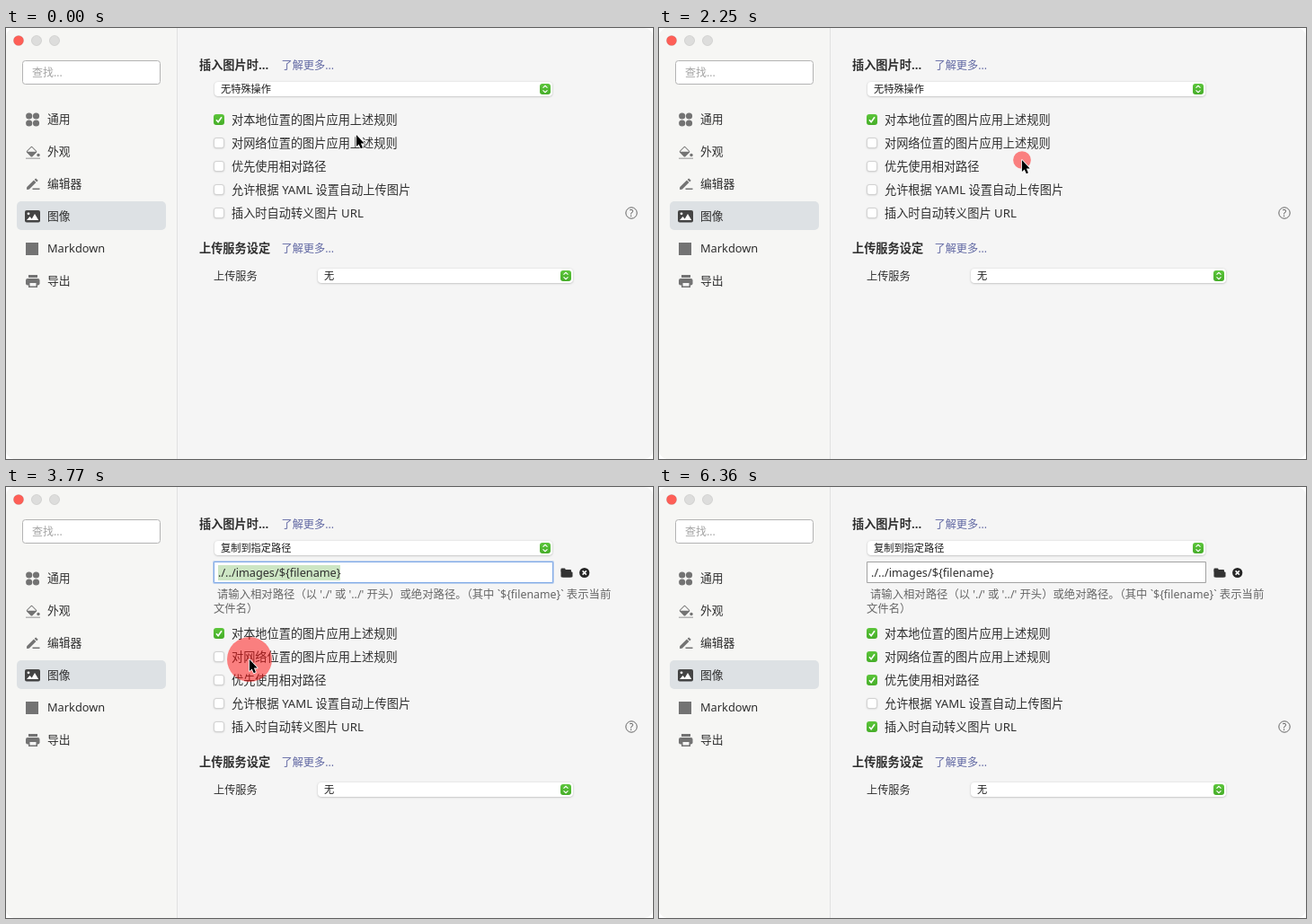
Write an HTML page with a canvas that moves like this. It is 720 px wide and 480 px high and loops after 7.55 s.

```html
<!DOCTYPE html>
<html lang="zh-CN">
<head>
<meta charset="utf-8">
<title>图像设置</title>
<style>
html, body { margin: 0; width: 100%; height: 100%; overflow: hidden; background: #fff; }
canvas { display: block; width: 720px; height: 480px; }
</style>
</head>
<body>
<canvas id="stage"></canvas>
<script>
const LOOP = 7550, MOVE = 310, RIPPLE = 450;
const FONT = '"Noto Sans", "Noto Sans CJK SC", "Noto Sans CJK", sans-serif';
const INK = '#2f2f2f', LINK = '#6168a3', ICON = '#737373', PANEL = '#f5f5f5', ROW = '#dde1e4';

const canvas = document.getElementById('stage');
const ctx = canvas.getContext('2d');
const dpr = window.devicePixelRatio || 1;
canvas.width = 720 * dpr;
canvas.height = 480 * dpr;

// Pointer stops: arrival time and place
const stops = [
  { at: 0, x: 389, y: 118 },
  { at: 570, x: 441, y: 72.5 },
  { at: 1450, x: 412, y: 116 },
  { at: 1790, x: 403, y: 146 },
  { at: 2670, x: 379, y: 122 },
  { at: 3200, x: 290, y: 174 },
  { at: 3510, x: 270, y: 191 },
  { at: 4190, x: 265, y: 226 },
  { at: 4610, x: 270, y: 223 },
  { at: 5220, x: 264, y: 264 },
  { at: 6170, x: 366, y: 351 }
];
const pointerEnd = 6340;
const clicks = [720, 2020, 3770, 4760, 5680];
const [, pick, tickWeb, tickRelative, tickEscape] = clicks;
const expandAt = pick + 390;

const options = [
  ['对本地位置的图片应用上述规则', 0],
  ['对网络位置的图片应用上述规则', tickWeb],
  ['优先使用相对路径', tickRelative],
  ['允许根据 YAML 设置自动上传图片', Infinity],
  ['插入时自动转义图片 URL', tickEscape]
];

function text(str, x, y, size = 13.2, color = INK, weight = 400) {
  ctx.font = `${weight} ${size}px ${FONT}`;
  ctx.fillStyle = color;
  ctx.fillText(str, x, y);
}

function paint(fill, stroke, width = 1) {
  if (fill) { ctx.fillStyle = fill; ctx.fill(); }
  if (stroke) { ctx.strokeStyle = stroke; ctx.lineWidth = width; ctx.stroke(); }
}

function box(x, y, w, h, r, fill, stroke) {
  ctx.beginPath();
  ctx.roundRect(x, y, w, h, r);
  paint(fill, stroke);
}

function disc(x, y, r, fill, stroke) {
  ctx.beginPath();
  ctx.arc(x, y, r, 0, Math.PI * 2);
  paint(fill, stroke);
}

function path(...points) {
  ctx.beginPath();
  for (let i = 0; i < points.length; i += 2) ctx.lineTo(points[i], points[i + 1]);
}

function at(x, y, angle, draw) {
  ctx.save();
  ctx.translate(x, y);
  ctx.rotate(angle);
  draw();
  ctx.restore();
}

function raised(x, y, w, h, r) {
  ctx.save();
  ctx.shadowColor = 'rgba(0,0,0,.28)';
  ctx.shadowBlur = 2 * dpr;
  ctx.shadowOffsetY = 0.6 * dpr;
  box(x, y, w, h, r, '#fff');
  ctx.restore();
}

function green(x, y) {
  const g = ctx.createLinearGradient(0, y, 0, y + 12);
  g.addColorStop(0, '#5cc53b');
  g.addColorStop(1, '#45ad28');
  box(x, y, 12, 12, 3, g);
}

function select(x, y, w, label) {
  raised(x, y, w, 16, 4);
  text(label, x + 7, y + 12, 11.2, '#1c1c1c');
  green(x + w - 14, y + 2);
  for (const dir of [-1, 1]) {
    at(x + w - 8, y + 8, 0, () => {
      path(-2.5, dir * 1.4, 0, dir * 3.7, 2.5, dir * 1.4);
      paint(null, '#fff', 1.2);
    });
  }
}

function checkbox(x, y, on) {
  if (on) {
    green(x, y);
    path(x + 3, y + 6.3, x + 5.1, y + 8.8, x + 9, y + 3.3);
    paint(null, '#fff', 1.6);
  } else {
    raised(x + 0.5, y + 0.5, 11, 11, 2.5);
    box(x + 0.5, y + 0.5, 11, 11, 2.5, null, '#d2d2d2');
  }
}

function peak(x, base, half, height) {
  path(x - half, base, x, base - height, x + half, base);
  paint('#fff');
}

function drawIcons() {
  for (const x of [25.7, 33.5]) for (const y of [98, 106]) disc(x, y, 3.6, ICON);

  // paint bucket
  at(28.5, 137.7, Math.PI / 4, () => {
    box(-4, -4, 8, 8, 1, null, ICON);
    path(-4, 4, 4, 4, 4, -4);
    paint(ICON);
  });
  disc(36, 141.5, 1.7, ICON);
  box(22, 144.5, 16, 1.5, 0, '#b4b4b4');

  // pencil
  at(23, 180, -Math.PI / 4, () => {
    path(0, 0, 2, -1.8, 13, -1.8, 13, 1.8, 2, 1.8);
    paint(ICON);
    box(14, -1.8, 2.2, 3.6, 0.5, ICON);
  });
  box(29.5, 178.5, 8, 1.5, 0, ICON);

  // picture
  box(21, 203, 17, 13.5, 2, '#444');
  disc(25, 206.8, 1.4, '#fff');
  peak(26.5, 214, 3.5, 4);
  peak(32, 214, 4.2, 7);

  box(22, 239, 14, 14, 0, ICON);

  // printer
  box(25, 275, 10, 3, 0, ICON);
  box(22, 279, 15.5, 7.5, 2, ICON);
  box(25, 283, 10, 6, 0, ICON);
  box(26.5, 284, 7, 3.5, 0, PANEL);
}

function drawSidebar() {
  box(0, 0, 720, 480, 10, PANEL);
  box(0, 0, 190, 480, [10, 0, 0, 10], '#f6f6f4');
  box(190, 0, 1, 480, 0, '#e1e1e1');
  ['#fe5f57', '#dddddc', '#dddddc'].forEach((c, i) => disc(14 + i * 20, 14, 5.6, c, 'rgba(0,0,0,.09)'));
  box(18.5, 36.5, 153, 26, 3, '#fff', '#b3b3b3');
  text('查找...', 29, 54, 12, '#a3a3a3');
  box(12, 193, 166, 32, 5, ROW);
  ['通用', '外观', '编辑器', '图像', 'Markdown', '导出'].forEach((s, i) => text(s, 46, 106 + i * 36, 12.8));
  drawIcons();
}

function drawPathField(focused) {
  box(231.5, 83.5, 377, 23, 0, '#fff', focused ? '#7fa9e6' : '#a2a2a2');
  if (focused) {
    box(230.5, 82.5, 379, 25, 1, null, 'rgba(127,169,230,.45)');
    box(236, 87, 136, 17, 0, '#cde6c4');
  }
  text('./../images/${filename}', 236, 100, 12.7);

  // folder and clear buttons
  box(617.5, 90.5, 5, 4, 1, '#333');
  box(617.5, 92, 11.5, 8.5, 1, '#333');
  box(619, 94.5, 11.5, 6, 1, '#333');
  disc(643.7, 95.5, 5.6, '#262626');
  at(643.7, 95.5, Math.PI / 4, () => {
    box(-3, -0.75, 6, 1.5, 0, '#fff');
    box(-0.75, -3, 1.5, 6, 0, '#fff');
  });

  text("请输入相对路径（以 './' 或 '../' 开头）或绝对路径。（其中 `${filename}` 表示当前", 235, 124, 12.35, '#666');
  text('文件名）', 231, 140, 12.35, '#666');
}

function heading(title, y) {
  text(title, 215, y, 13.2, INK, 700);
  text('了解更多...', 306.5, y, 12.2, LINK);
}

function drawPanel(t) {
  const open = t >= expandAt;
  heading('插入图片时...', 46);
  select(232, 60, 376, open ? '复制到指定路径' : '无特殊操作');
  if (open) drawPathField(t < tickWeb + 20);

  at(0, open ? 61 : 0, 0, () => {
    options.forEach(([label, click], i) => {
      const y = 102 + i * 26;
      checkbox(231, y - 6, !click || t >= click + 100);
      text(label, 251, y + 5);
    });
    disc(696, 206, 6.2, null, '#666');
    text('?', 693.8, 209.6, 10, '#555');
    heading('上传服务设定', 250);
    text('上传服务', 231, 280.5, 12.2);
    select(347, 268, 284, '无');
  });
}

function pointerAt(t) {
  let { x, y, at: last } = stops[0];
  for (const stop of stops.slice(1)) {
    const from = Math.max(last, stop.at - MOVE);
    const p = Math.min(1, Math.max(0, (t - from) / (stop.at - from)));
    const e = p * p * (3 - 2 * p);
    x += (stop.x - x) * e;
    y += (stop.y - y) * e;
    last = stop.at;
  }
  return [x, y];
}

function drawPointer(t) {
  for (const click of clicks) {
    const p = (t - click) / RIPPLE;
    if (p < 0 || p >= 1) continue;
    const [x, y] = pointerAt(click);
    disc(x + 1, y + 1, 25 * (1 - p) ** 1.3, 'rgba(255,10,10,.5)');
  }
  if (t >= pointerEnd) return;
  at(...pointerAt(t), 0, () => {
    path(0.9, 1, 0.9, 14, 3.7, 11.4, 5.8, 16.2, 7.9, 15.3, 5.9, 10.6, 9.7, 10.6);
    ctx.closePath();
    ctx.lineJoin = 'round';
    paint(null, '#fff', 1.6);
    paint('#000');
  });
}

function frame(t) {
  ctx.setTransform(dpr, 0, 0, dpr, 0, 0);
  ctx.fillStyle = '#fff';
  ctx.fillRect(0, 0, 720, 480);
  drawSidebar();
  drawPanel(t);
  drawPointer(t);
}

let start;
function tick(now) {
  start ??= now;
  frame((now - start) % LOOP);
  requestAnimationFrame(tick);
}
requestAnimationFrame(tick);
</script>
</body>
</html>
```
